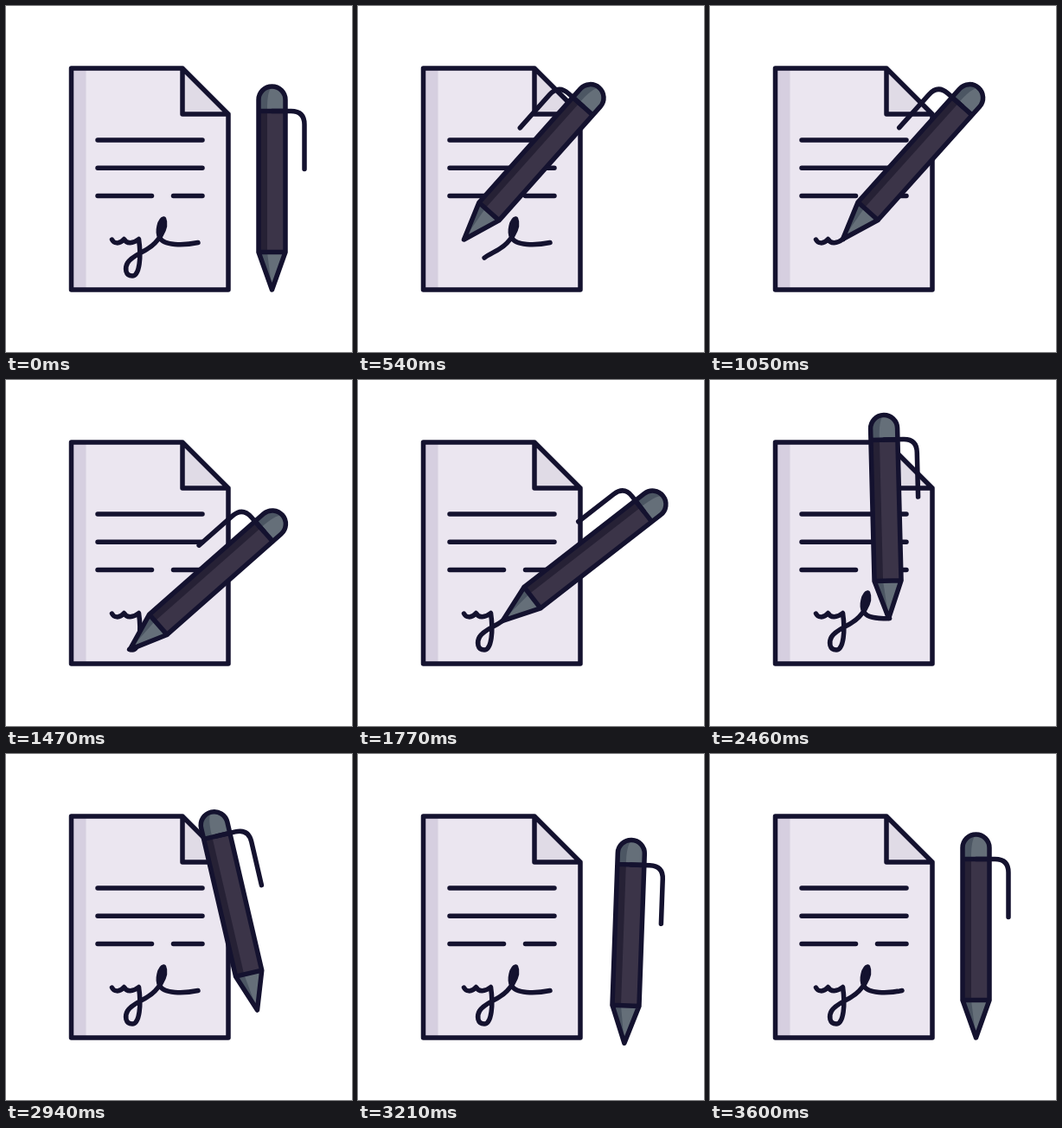
Write an HTML page that moves like this. It is 400 by 400 pixels and loops after 4.63 s.

```html
<!DOCTYPE html>
<html lang="en">
<head>
<meta charset="utf-8">
<title>Signing a document</title>
<style>
  html, body { margin: 0; width: 100%; height: 100%; overflow: hidden; background: #fff; }
  svg { display: block; width: 100%; height: 100%; }
  .ink { fill: none; stroke: #14122f; stroke-width: 5.5; stroke-linecap: round; stroke-linejoin: round; }
</style>
</head>
<body>
<svg viewBox="0 0 400 400">
  <path fill="#ebe6f0" d="M75.5 72H204L257 125V328H75.5Z"/>
  <path fill="#d6cfe0" d="M75.5 72H92.5V328H75.5Z"/>
  <path fill="#e0dbe6" d="M204 72V125H257Z"/>
  <path class="ink" d="M75.5 72H204L257 125V328H75.5ZM204 72V125H257"/>
  <path class="ink" d="M106 155H227M106 187.3H227M106 219.5H168.5M193.5 219.5H227"/>
  <path class="ink" id="scribble"/>
  <path id="leaf" fill="#14122f" d="M182 246Q174 258 177.5 267Q186 258 182 246Z"/>
  <!-- pen drawn with its tip at the origin -->
  <g id="pen">
    <path fill="#656f79" d="M-15.5 -206.5V-219.5A15.5 15.5 0 0 1 15.5 -219.5V-206.5Z"/>
    <path fill="#4c5663" d="M-15.5 -206.5V-219.5A15.5 15.5 0 0 1 0 -235Q-6 -229 -5.5 -206.5Z"/>
    <path fill="#3b3448" d="M-15.5 -206.5H15.5V-43.5H-15.5Z"/>
    <path fill="#262135" d="M-15.5 -206.5H-5.5V-43.5H-15.5Z"/>
    <path fill="#656f79" d="M-15.5 -43.5H15.5L0 0Z"/>
    <path fill="#4c5663" d="M-15.5 -43.5H-5.5L0 0Z"/>
    <path class="ink" d="M-15.5 -43.5V-219.5A15.5 15.5 0 0 1 15.5 -219.5V-43.5ZM-15.5 -206.5H15.5M-15.5 -43.5L0 0L15.5 -43.5"/>
    <path class="ink" id="clip"/>
  </g>
</svg>
<script>
const LOOP = 4630, STEP = 30, MOVE_END = 3600;
const WRITE_START = 540, WRITE_END = 2580;
const $ = id => document.getElementById(id);
const scribble = $('scribble'), leaf = $('leaf'), pen = $('pen'), clip = $('clip');

// pen strokes: [time at which the stroke is finished, curve]
const strokes = [
  [780, 'C124.5 274.5 131 276 136.5 269.5'],
  [1050, 'C139 275 147 275 153.5 269.5'],
  [1455, 'C156.5 290 154.5 312 146 312'],
  [1560, 'C138 312 137 303 140.5 297'],
  [1740, 'C145 289.5 156 286 164 280.5'],
  [2070, 'C175 274 187.5 257 182.5 246'],
  [2220, 'C178 247 174 260 178 268'],
  [WRITE_END, 'C182 277 205 277 222 273.5']
];
let d = 'M122.5 270';
const writeKeys = [[WRITE_START, 0]];
for (const [t, curve] of strokes) {
  d += curve;
  scribble.setAttribute('d', d);
  writeKeys.push([t, scribble.getTotalLength()]);
}
const total = scribble.getTotalLength();
const loopTop = writeKeys[6][1], loopEnd = writeKeys[7][1];

const clamp = v => Math.max(0, Math.min(1, v));
const smooth = v => (v = clamp(v), v * v * (3 - 2 * v));
const mix = (a, b, u) => a + (b - a) * u;

function linear(keys, t) {
  let i = 1;
  while (i < keys.length - 1 && t > keys[i][0]) i++;
  const [t0, a] = keys[i - 1], [t1, b] = keys[i];
  return mix(a, b, clamp((t - t0) / (t1 - t0)));
}

// smooth curve through the keys, flat at turning points and ends
function curve(keys, t) {
  const slope = i => {
    const p = keys[i - 1], k = keys[i], n = keys[i + 1];
    if (!p || !n || (k[1] - p[1]) * (n[1] - k[1]) <= 0) return 0;
    return (n[1] - p[1]) / (n[0] - p[0]);
  };
  let i = 1;
  while (i < keys.length - 1 && t > keys[i][0]) i++;
  const [t0, a] = keys[i - 1], [t1, b] = keys[i], h = t1 - t0;
  const u = clamp((t - t0) / h), v = 1 - u;
  return a * v * v * (1 + 2 * u) + b * u * u * (3 - 2 * u)
    + h * u * v * (v * slope(i - 1) - u * slope(i));
}

const tilt = [[0, 0], [540, 41.7], [780, 33.5], [1050, 41.9], [1470, 48.6], [1740, 53],
  [2040, 9.9], [2250, -10], [2700, 9], [2940, -13.1], [3240, 2.5], [3600, 0]];
const turn = [[0, 1], [540, -1], [1740, -1], [2040, 0.1], [2340, 1], [3600, 1]];
const backX = [[2580, 222], [2700, 228], [2940, 290.5], [3240, 308], [3600, 307.5]];
const backY = [[2580, 273.5], [2700, 257], [2940, 296], [3240, 335], [3600, 328]];

function tipAt(t, written) {
  if (t < WRITE_START) {
    const u = smooth(t / WRITE_START);
    return { x: mix(307.5, 123, u), y: mix(328, 268.5, u * u) };
  }
  if (t <= WRITE_END) return scribble.getPointAtLength(written);
  return { x: curve(backX, t), y: curve(backY, t) };
}

function draw(t) {
  const written = linear(writeKeys, t);
  const erased = total * smooth((t - 120) / 900);

  // visible runs: what is newly written, then what is not yet erased
  const fresh = t > WRITE_START ? written : 0;
  const old = t < 1020 ? total - erased : 0;
  const gap = Math.max(0, total - fresh - old);
  scribble.style.strokeDasharray = fresh > 0
    ? `${fresh} ${gap} ${old} ${total}`
    : `0 ${gap} ${old} ${total}`;
  scribble.style.strokeDashoffset = 0;
  scribble.style.strokeLinecap = fresh + old > 0 ? 'round' : 'butt';
  if (fresh <= 0) {
    scribble.style.strokeDasharray = `${old} ${total * 2}`;
    scribble.style.strokeDashoffset = -gap;
  } else if (old <= 0) {
    scribble.style.strokeDasharray = `${fresh} ${total * 2}`;
  }
  leaf.style.display = (old > total - loopTop || fresh >= loopEnd) ? '' : 'none';

  const tip = tipAt(t, written), s = curve(turn, t);
  pen.setAttribute('transform', `translate(${tip.x} ${tip.y}) rotate(${curve(tilt, t)})`);
  clip.setAttribute('d', `M0 -206.5H${22 * s}Q${37.5 * s} -206.5 ${37.5 * s} -191V-139.5`);
}

const start = performance.now();
function tick() {
  const t = (performance.now() - start) % LOOP;
  draw(Math.min(MOVE_END, Math.floor(t / STEP) * STEP));
  requestAnimationFrame(tick);
}
tick();
</script>
</body>
</html>
```
